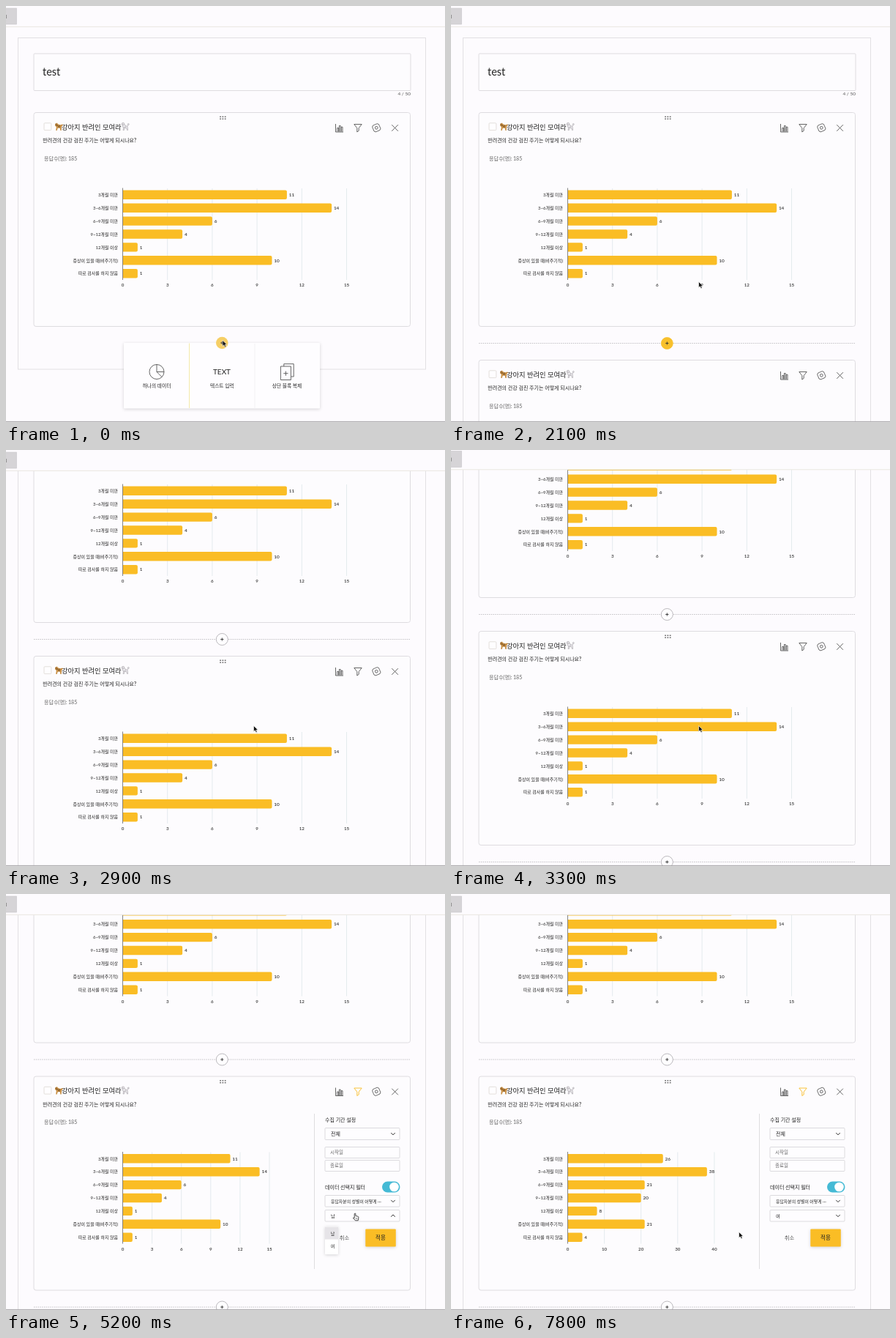
An HTML page that plays this animation: 600 by 568 pixels, repeating every 8 s.

```html
<!DOCTYPE html>
<html lang="ko">
<head>
<meta charset="utf-8">
<title>Survey dashboard</title>
<style>
  html, body { margin: 0; width: 100%; height: 100%; overflow: hidden; background: #fdfbfe; }
  svg { display: block; width: 100vw; height: 100vh; }
  text { font-family: Lato, "Noto Sans CJK KR", "Noto Sans CJK", sans-serif; fill: #222; }
  .m { text-anchor: middle; }
  .e { text-anchor: end; }
  .med { font-weight: 500; }
  .bold { font-weight: 700; }
  .box { fill: #fdfcfe; stroke: #dedce0; }
  .field { fill: #fefdff; stroke: #d3d2d6; stroke-width: .8; }
  .icon { fill: none; stroke: #555; stroke-width: .9; stroke-linejoin: round; }
  .chev { fill: none; stroke: #333; stroke-width: 1; }
  .shadow { filter: drop-shadow(0 1px 2px rgba(0, 0, 0, .16)); }
</style>
</head>
<body>
<svg id="stage" viewBox="0 0 600 568" preserveAspectRatio="none"></svg>
<script>
const YELLOW = '#fabd25', BLUE = '#45bad5', LOOP = 8000;
const LABELS = ['3개월 미만', '3~6개월 미만', '6~9개월 미만', '9~12개월 미만', '12개월 이상', '증상이 있을 때(비주기적)', '따로 검사를 하지 않음'];
const ALL = [11, 14, 6, 4, 1, 10, 1], FEMALE = [26, 38, 21, 20, 8, 21, 4];
const CARD_H = 292, CARD1 = 145.5, CARD2 = 483.5, LOAD_H = 261;

const text = (x, y, size, str, cls = '', extra = '') =>
  `<text x="${x}" y="${y}" font-size="${size}" class="${cls}" ${extra}>${str}</text>`;
const rect = (x, y, w, h, attrs = '') => `<rect x="${x}" y="${y}" width="${w}" height="${h}" ${attrs}/>`;
const path = (d, attrs = 'class="icon"') => `<path d="${d}" ${attrs}/>`;
const group = (id, body, attrs = '') => `<g id="${id}" ${attrs}>${body}</g>`;
const chevron = (x, y, up) => path(`M${x - 2.7} ${y + (up ? 1.4 : -1.4)}l2.7 ${up ? -2.8 : 2.8}l2.7 ${up ? 2.8 : -2.8}`, 'class="chev"');

// Horizontal bar chart, relative to the card's top edge
function chart(values, step, gap) {
  const x0 = 159.5;
  let out = '';
  for (let i = 0; i * gap <= (step * 5 > 20 ? 40 : 15) && i < 6; i++) {
    const x = x0 + i * (gap === 10 ? 50.1 : step);
    if (i) out += path(`M${x} 103.5V228.5`, 'stroke="#e1e9ed" stroke-width=".9"');
    out += text(x, 237.7, 6.2, i * gap, 'm med');
  }
  const unit = gap === 10 ? 5.01 : step / gap;
  values.forEach((v, i) => {
    const y = 112.3 + i * 17.9, w = v * unit;
    out += path(`M${x0} ${y - 6.2}h${w - 2}q2 0 2 2v8.4q0 2 -2 2h${2 - w}z`, `fill="${YELLOW}"`);
    out += text(x0 + w + 2.8, y + 2.2, 6.4, v, 'med');
    out += text(153, y + 2.2, 6, LABELS[i], 'e');
  });
  return out + path(`M${x0} 103V228.5`, 'stroke="#777" stroke-width=".9"');
}

const goldenDog = `<g transform="translate(66 13)">
  <path d="M1 3l2.5-2 2 2 2.5 1 3-1 .8 1-1.8 2.2-.3 5.3h-1.4l-.6-3.4-3 .2-1 3.2H2.2l.6-5L1 5z" fill="#c99045"/>
  <path d="M4.4 3.8l2.6 4M7.6 4l-1.2 3.6M2 2l1.6 3.6" stroke="#6b4a25" stroke-width=".9" fill="none"/></g>`;
const poodle = `<g transform="translate(157 13)" fill="#eceaee" stroke="#a3a0a5" stroke-width=".6">
  <path d="M4 5.5h5l.6 5.5H8.4L7.6 8H5l-.6 3H3z"/>
  <circle cx="3" cy="2.6" r="1.8"/><circle cx="4.4" cy="5.5" r="2.1"/><circle cx="10.3" cy="3" r="1"/>
  <path d="M1.6 3l-1 .7M9 5.5l1-1.8" fill="none"/><circle cx="2.5" cy="2.6" r=".25"/></g>`;

const gear = () => {
  let d = '';
  for (let i = 0; i < 16; i++) {
    const a = (i + .5) * Math.PI / 8, r = i % 4 < 2 ? 5.7 : 4.9;
    d += `${i ? 'L' : 'M'}${(506.3 + r * Math.cos(a)).toFixed(2)} ${(20.8 + r * Math.sin(a)).toFixed(2)}`;
  }
  return path(d + 'z') + '<circle cx="506.3" cy="20.8" r="1.9" class="icon"/>';
};

function card(n, y, body) {
  let dots = '';
  for (let i = 0; i < 6; i++) dots += rect(292.2 + i % 3 * 3.3, 5 + (i > 2) * 2.9, 1.7, 1.5, 'fill="#666"');
  return group('card' + n,
    rect(38, 0, 514.5, CARD_H, `id="frame${n}" class="box" rx="3"`) +
    group('handle' + n, dots) +
    rect(52, 14.3, 9.8, 9.8, 'fill="#fefdff" stroke="#ddd8d2" stroke-width=".8" rx="1"') +
    text(76, 23, 9.3, '강아지 반려인 모여라', 'med') + goldenDog + poodle +
    text(50.3, 40.8, 7, '반려견의 건강 검진 주기는 어떻게 되시나요?', 'med') +
    path('M450.5 15.5v11h10.5M452.7 26v-5h1.8v5M455.4 26v-8h1.8v8M458.2 26v-6.3h1.8v6.3') +
    path('M475.8 16h10.4l-4 5.2v3.6l-2.4 1.7v-5.3z', `id="funnel${n}" class="icon"`) + gear() +
    path('M527.3 16.7l8.6 8.6M535.9 16.7l-8.6 8.6') + body,
    `transform="translate(0 ${y})"`);
}

const count = text(52, 65, 7, '응답수(명): 185', '', 'style="fill:#666"');

const adder = (n, y) => group('adder' + n,
  path('M38 0H553', 'stroke="#bdbbbf" stroke-width=".9" stroke-dasharray="1.5 1.3"') +
  `<circle id="plus${n}" cx="295.3" r="8" fill="#fefdff" stroke="#aaa8ac" stroke-width=".8"/>` +
  path('M293.2 0h4.2M295.3 -2.1v4.2', 'stroke="#333" stroke-width=".9"'),
  `transform="translate(0 ${y})"`);

const selectBox = (y, h, label, size, cls = '') =>
  rect(436, y, 102, h, 'class="field" rx="1"') + text(444, y + h / 2 + 2.5, size, label, cls);

const panel = group('panel',
  path('M421.5 51V263', 'id="divider" stroke="#dcdadd" stroke-width=".9"') +
  text(436, 61.6, 7, '수집 기간 설정', 'med') +
  selectBox(70.5, 16, '전체', 7, 'med') + chevron(529, 78.5) +
  rect(436, 96.5, 102, 15, 'class="field" rx="1"') + text(443, 106.4, 6.5, '시작일', '', 'style="fill:#666"') +
  rect(436, 114.5, 102, 15, 'class="field" rx="1"') + text(443, 124.4, 6.5, '종료일', '', 'style="fill:#666"') +
  text(436, 153.5, 7, '데이터 선택지 필터', 'med') +
  rect(514, 143.5, 24.5, 15, 'id="track" rx="7.5"') + '<circle id="knob" cy="151" r="6.3" fill="#fff"/>' +
  group('filters',
    selectBox(162.5, 15.5, '응답자분의 성별이 어떻게 ···', 5.9, 'med') + chevron(529, 170.3) +
    selectBox(182.5, 15.5, '', 6.2) + text(444, 192.6, 6.2, '남', 'med', 'id="gender"') +
    group('chevDown', chevron(529, 190.3)) + group('chevUp', chevron(529, 190.3, true))) +
  group('buttons',
    rect(443, 208.5, 41.5, 24, 'id="cancelBg" fill="#e4e2e6" rx="1"') +
    text(462.5, 223, 7.3, '취소', 'm', 'style="fill:#555"') +
    rect(491.3, 208.5, 41.5, 24, 'id="apply" class="shadow" rx="1"') +
    text(512, 223, 7.5, '적용', 'm med', 'id="applyText"') +
    path('M508.6 218.4a3.6 3.6 0 0 1 4.4 -2.2', 'id="spinner" fill="none" stroke="#333" stroke-width="1.1"')) +
  group('options',
    rect(436, 205, 18, 38, 'fill="#fff" class="shadow" rx="1"') +
    rect(436, 205.5, 18, 17, 'id="optionBg" fill="#e6e4e8"') +
    text(446.5, 217, 6, '남', 'm med') + text(446.5, 233.5, 6, '여', 'm med')));

const loader = group('loader',
  [197.5, 237, 276.7].map((x, i) => `<g id="dot${i}"><circle cx="${x}" r="6.4" fill="${BLUE}"/>` +
    (i ? '' : `<circle cx="${x}" r="5.7" fill="none" stroke="#d99d55" stroke-width="1.4"/>
      <circle cx="${x}" r="2.8" fill="none" stroke="#d99d55" stroke-width="1.5" stroke-dasharray="1.5 1.5"/>`) + '</g>').join('') +
  text(237, 141, 7, '앗 분석을 위해선 시간이 조금 더 필요해요.', 'm med') +
  text(237, 151.5, 7, '잠시만 기다려주시면 빠르게 처리할게요!', 'm med'));

const menu = group('menu',
  rect(161, 460, 268, 89.5, 'fill="#fefdff" class="shadow" rx="1"') +
  path('M250.5 460.5V549', 'stroke="#f3eaa9" stroke-width="1"') +
  path('M340 461V549', 'stroke="#f3f1f3" stroke-width="1"') +
  '<circle cx="206" cy="499.5" r="10" class="icon"/>' + path('M206 489.5v10h10M206 499.5l7 7') +
  text(295, 503.2, 10, 'TEXT', 'm') +
  path('M379.8 492v-3.3h13.4v17.3h-3.4M375.4 492h14v18.5h-14zM379.3 501.7h6.2M382.4 498.6v6.2') +
  text(206, 520.5, 6.7, '하나의 데이터', 'm med') +
  text(295.3, 520.5, 6.7, '텍스트 입력', 'm med') +
  text(384, 520.5, 6.7, '상단 블록 복제', 'm med') +
  '<circle id="openPlus" cx="295.3" cy="460" r="8.3"/>' +
  path('M293.3 460h4M295.3 458v4', 'stroke="#333" stroke-width="1"'));

document.getElementById('stage').innerHTML =
  `<defs><clipPath id="view">${rect(0, 28.5, 600, 545)}</clipPath></defs>` +
  rect(0, 0, 600, 568, 'fill="#fdfbfe"') +
  group('page',
    `<g clip-path="url(#view)">` + group('scroll',
      rect(16.5, 43.5, 557, 452.5, 'id="outer" fill="none" stroke="#e2e0e3"') +
      rect(38, 65, 515, 50.5, 'class="box" rx="1"') +
      text(50, 95, 14.5, 'test') +
      text(553, 122, 6.5, '4 / 50', 'e', 'style="fill:#555"') +
      card(1, CARD1, count + chart(ALL, 61.2, 3)) + adder(1, 460.5) +
      card(2, CARD2,
        group('count2', count) + group('wide', chart(ALL, 61.2, 3)) + group('narrow', chart(ALL, 40.1, 3)) +
        group('female', chart(FEMALE, 50.1, 10)) + loader + panel) +
      adder(2, CARD2 + CARD_H + 23) + menu) + '</g>' +
    path('M0 28.3H600', 'stroke="#e9e7e0" stroke-width="1"') +
    rect(-2, 3, 16.5, 22, 'fill="#d6d4d7" stroke="#c9c7ca" stroke-width=".6"') +
    path('M.4 12v5', 'stroke="#777" stroke-width=".8"')) +
  path('M0 567.4H600', 'stroke="#a9a7ab" stroke-width="1"') +
  group('cursor',
    group('arrow', path('M0 0v8l1.9-1.7 1.3 3 1.5-.7-1.3-2.8h2.5z', 'fill="#111" stroke="#fff" stroke-width=".6"')) +
    group('hand', path('M2.2 1q1-1 1.7 0v3l3 .7q1.2.4 1 1.6l-.7 4H3.4L.4 6.8q.4-1 1.8 0z',
      'fill="#fff" stroke="#333" stroke-width=".9" stroke-linejoin="round"') +
      path('M4.1 6.4v2.2M5.6 6.4v2.2', 'stroke="#555" stroke-width=".6"')));

const el = {};
document.querySelectorAll('#stage [id]').forEach(n => el[n.id] = n);
const set = (id, attrs) => { for (const k in attrs) el[id].setAttribute(k, attrs[k]); };
const show = (id, on) => el[id].setAttribute('visibility', on ? 'inherit' : 'hidden');
const move = (id, x, y) => set(id, { transform: `translate(${x} ${y})` });

// Eased interpolation through [time, ...values] keys
function at(keys, t, ease = p => p * p * (3 - 2 * p)) {
  const i = keys.findIndex(k => k[0] > t);
  if (i < 0) return keys[keys.length - 1].slice(1);
  if (!i) return keys[0].slice(1);
  const a = keys[i - 1], b = keys[i], p = ease((t - a[0]) / (b[0] - a[0]));
  return a.slice(1).map((v, j) => v + (b[j + 1] - v) * p);
}

const SCROLL = [[2200, 0], [2300, 13], [2600, 105], [2900, 202], [3000, 222], [3200, 234.5]];
const POINTER = [
  [400, 296, 456.5], [900, 384, 505], [1300, 384, 505], [1900, 338.5, 376.5], [3300, 338.5, 376.5],
  [3800, 479, 267], [4000, 479, 267], [4400, 524, 397], [4600, 524, 397], [5000, 474, 435.5],
  [5300, 474, 435.5], [5500, 445, 477], [5600, 445, 477], [5800, 510, 466], [6100, 510, 466],
  [6700, 464, 473], [6900, 464, 473], [7500, 393.5, 461.5]
];
const HAND = [[700, 1300], [3700, 4100], [4300, 4700], [4900, 7100]];

function draw(t) {
  const within = (a, b) => t >= a && t < b;
  const copied = t >= 1500, open = t >= 3900, filterOn = t >= 4500;
  const picking = within(5000, 5600), loading = within(6100, 7200), done = t >= 7200;
  const height = loading ? LOAD_H : CARD_H;

  move('page', 0, within(3200, 3500) ? -1.5 : 0);
  move('scroll', 0, -at(SCROLL, t, p => p)[0]);
  set('outer', { height: copied ? CARD2 + height + 58 - 43.5 : 452.5 });

  show('menu', t < 1100);
  set('openPlus', { fill: t < 100 ? '#f6cf66' : '#f8c333' });
  show('adder1', t >= 1100);
  set('plus1', t < 2300 ? { fill: '#f8c02c', stroke: '#f8c02c' } : { fill: '#fefdff', stroke: '#aaa8ac' });
  show('card2', copied);
  show('adder2', copied);
  show('handle1', t < 2300);
  show('handle2', copied && t >= 2800);

  set('frame2', { height });
  move('adder2', 0, CARD2 + height + 23);
  set('funnel2', { style: open ? `stroke:${YELLOW}` : '' });
  show('count2', copied && !loading);
  show('wide', copied && !open);
  show('narrow', open && !loading && !done);
  show('female', done);
  show('loader', loading);
  for (let i = 0; i < 3; i++) {
    move('dot' + i, 0, 110 + 4 * Math.sin((t - 6800) / 900 * 2 * Math.PI + i * 2 * Math.PI / 3));
  }

  show('panel', open);
  set('divider', { d: `M421.5 51V${loading ? 188 : 263}` });
  set('track', { fill: filterOn ? BLUE : '#cfcdd1' });
  set('knob', { cx: filterOn ? 530.5 : 521.8 });
  show('filters', filterOn);
  move('buttons', 0, filterOn ? 0 : -40);
  el.gender.textContent = t < 5600 ? '남' : '여';
  show('chevUp', picking);
  show('chevDown', filterOn && !picking);
  show('options', picking);
  set('optionBg', { y: t < 5500 ? 205.5 : 225 });
  show('cancelBg', within(6600, 7100));
  set('apply', { fill: loading ? '#fdf1c3' : YELLOW });
  show('applyText', open && !loading);
  show('spinner', loading);
  set('spinner', { transform: `rotate(${(t - 6800) * .36} 511.8 219.6)` });

  const hand = HAND.some(h => within(...h));
  move('cursor', ...at(POINTER, t));
  show('hand', hand);
  show('arrow', !hand);
}

const start = performance.now();
function tick() {
  draw(Math.floor((performance.now() - start) % LOOP / 100) * 100);
  requestAnimationFrame(tick);
}
tick();
</script>
</body>
</html>
```
